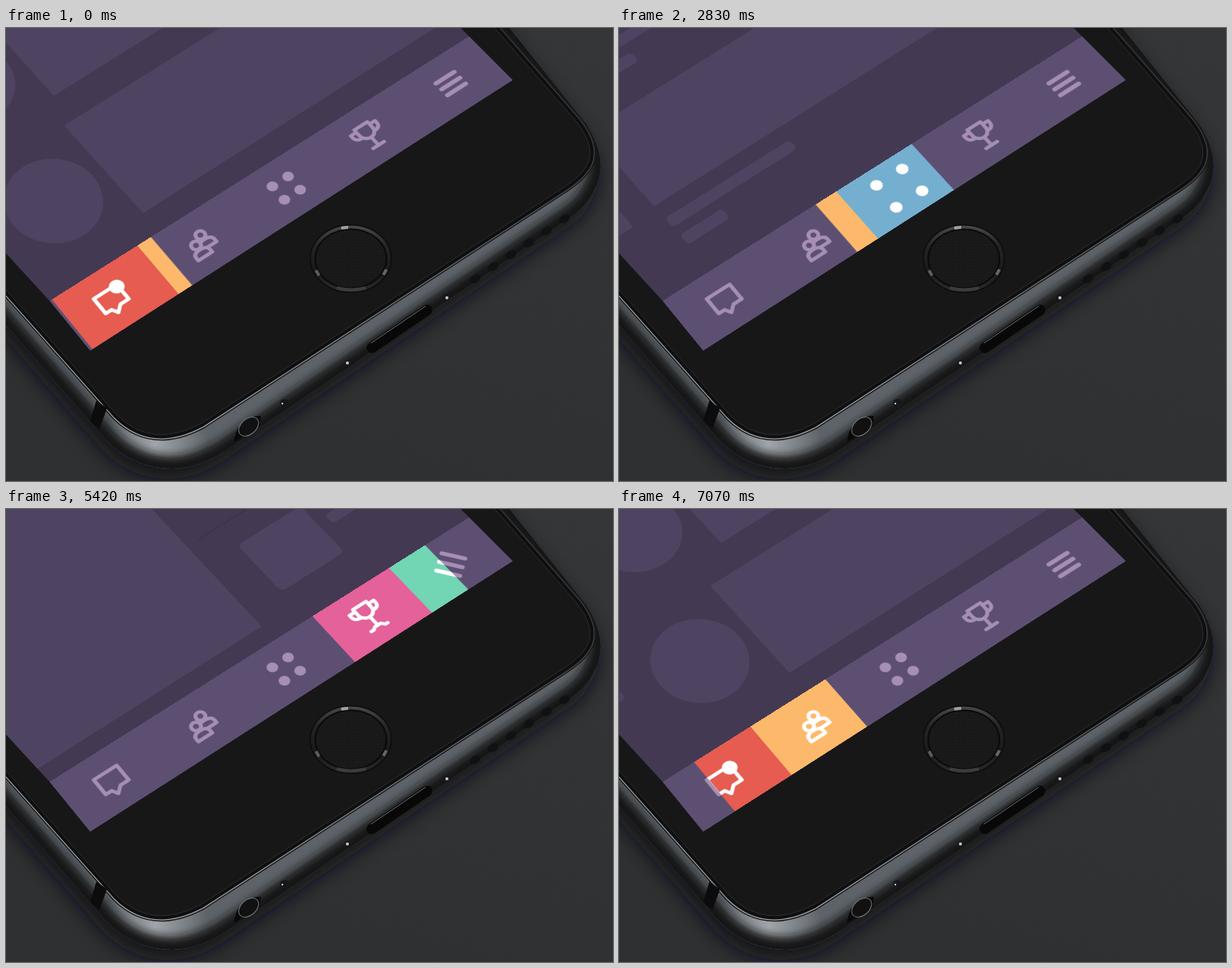
Write an HTML page that moves like this. It is 793 px wide and 591 px high and loops after 7120 ms.

```html
<!DOCTYPE html>
<html lang="en">
<head>
<meta charset="utf-8">
<title>Tab bar</title>
<style>
  html, body { margin: 0; width: 100%; height: 100%; overflow: hidden; background: #333436; }
  #stage { position: relative; width: 793px; height: 591px; overflow: hidden; }
  #stage > svg, #screen { position: absolute; left: 0; top: 0; }
  #screen {
    width: 793px; height: 591px; background: #443952;
    clip-path: polygon(0 0, 594px 0, 662px 68px, 110px 421px, 57px 356px, 0 294px);
  }
  #screen svg { position: absolute; left: 0; top: 0; transform-origin: 0 0; overflow: visible; }
  #pages { fill: #4e4461; }
  .icon { fill: none; stroke: currentColor; stroke-width: 5.5; stroke-linejoin: round; stroke-linecap: round; }
  .solid { fill: currentColor; stroke: none; }
  .front { fill: var(--back); }
</style>
</head>
<body>
<div id="stage">
  <svg width="793" height="591" viewBox="0 0 793 591">
    <defs>
      <linearGradient id="bg" x1="1" y1="0" x2=".6" y2="1">
        <stop offset="0" stop-color="#353638"/><stop offset="1" stop-color="#2f3032"/>
      </linearGradient>
      <linearGradient id="edge" gradientUnits="userSpaceOnUse" x1="760" y1="0" x2="300" y2="500">
        <stop offset="0" stop-color="#2b2d2f"/><stop offset=".45" stop-color="#5c6165"/>
        <stop offset="1" stop-color="#a0a5a9"/>
      </linearGradient>
      <radialGradient id="shine" gradientUnits="userSpaceOnUse" cx="195" cy="544" r="70">
        <stop offset="0" stop-color="#b4b8bc" stop-opacity=".8"/>
        <stop offset="1" stop-color="#b4b8bc" stop-opacity="0"/>
      </radialGradient>
      <linearGradient id="ring" x1="0" y1="0" x2="0" y2="1">
        <stop offset="0" stop-color="#4a4a4a"/><stop offset=".3" stop-color="#242424"/>
        <stop offset=".7" stop-color="#191919"/><stop offset="1" stop-color="#2c2c2c"/>
      </linearGradient>
      <pattern id="mesh" width="4" height="4" patternUnits="userSpaceOnUse">
        <rect width="4" height="4" fill="#1a1a1a"/><rect width="1.5" height="1.5" fill="#141414"/>
      </pattern>
      <filter id="soft" x="-20%" y="-20%" width="140%" height="140%"><feGaussianBlur stdDeviation="13"/></filter>
      <filter id="falloff" x="-20%" y="-20%" width="140%" height="140%"><feGaussianBlur stdDeviation="6"/></filter>
      <path id="body" d="M-40 -20H642L758 125Q790 175 768 213Q760 232 735 249L300 543Q258 574 218 575Q165 575 128 535L-40 342Z"/>
      <path id="glass" d="M-20 -20H621L745 122Q775 160 755 185Q748 195 730 207L255 516Q190 550 145 505L-20 319Z"/>
      <clipPath id="inside"><use href="#body"/></clipPath>
    </defs>
    <rect width="793" height="591" fill="url(#bg)"/>
    <use href="#body" x="-4" y="13" fill="#101112" opacity=".85" filter="url(#soft)"/>
    <use href="#body" fill="#5d6368"/>
    <g clip-path="url(#inside)">
      <use href="#body" fill="url(#shine)"/>
      <use href="#body" fill="none" stroke="#141516" stroke-width="32" filter="url(#falloff)"/>
    </g>
    <use href="#glass" fill="none" stroke="#1a1b1c" stroke-width="15"/>
    <use href="#glass" fill="none" stroke="url(#edge)" stroke-width="12"/>
    <use href="#glass" fill="none" stroke="#0f0f10" stroke-width="9.500"/>
    <use href="#glass" fill="#171717" stroke="#2c2d2f" stroke-width="1"/>
    <path d="M118 486L132 496L122 523L110 513Z" fill="#0c0c0d"/>
    <path d="M478 417L550 368" stroke="#080808" stroke-width="14" stroke-linecap="round"/>
    <path d="M477 411L548 363" stroke="#6c7175" stroke-width="1" stroke-linecap="round"/>
    <path d="M298 540Q302 505 333 506L331 520Z" fill="#090909"/>
    <ellipse cx="317" cy="520" rx="15" ry="10" fill="#111" stroke="#75797d" stroke-width="1" transform="rotate(-42 317 520)"/>
    <g id="holes" fill="#101112"></g>
    <g fill="#17181a"><circle cx="447" cy="437" r="4.5"/><circle cx="576" cy="351" r="4.5"/><circle cx="364" cy="490" r="6"/></g>
    <g fill="#c5c8ca"><circle cx="446" cy="437" r="2"/><circle cx="576" cy="352" r="2"/><circle cx="361" cy="490" r="1.2"/></g>
    <ellipse cx="450.500" cy="301" rx="53" ry="44" fill="url(#ring)" stroke="#0c0c0c" stroke-width="1.5"/>
    <ellipse cx="450.500" cy="301" rx="46.500" ry="38.500" fill="url(#mesh)" stroke="#0a0a0a" stroke-width="2"/>
    <g fill="none" stroke-width="4">
      <path d="M438 261L447 260" stroke="#a0a0a0"/><path d="M493 322L497 315" stroke="#666"/>
      <path d="M405 316L409 323" stroke="#5c5c5c"/><path d="M432 339Q451 344 470 339" stroke="#3c3c3c"/>
    </g>
  </svg>

  <div id="screen">
    <svg id="pages" width="750" height="600"></svg>
    <svg id="bar" width="750" height="98">
      <clipPath id="win"><rect id="slot" height="98"/></clipPath>
      <rect width="750" height="98" fill="#5d4f72"/>
      <g id="idle" color="#a58fb2"></g>
      <g clip-path="url(#win)"><g id="tabs"></g><g id="active" color="#fff"></g></g>
    </svg>
  </div>
</div>

<script>
const $ = id => document.getElementById(id);
const LOOP = 7120;
const COLORS = ['#e65c50', '#fdb96b', '#75afd0', '#e56199', '#72d5b4'];

// from tab, to tab, start of the highlight, start of the page slide
const MOVES = [
  [4, 0, -905, -859],
  [0, 1, 720, 720],
  [1, 2, 2130, 2130],
  [2, 3, 3550, 3550],
  [3, 4, 4985, 4985],
  [4, 0, 6355, 6372]
];

const mix = (a, b, f) => a + (b - a) * f;

// The curve cubic-bezier(.25, .1, .25, 1), solved by bisection.
function ease(p) {
  if (p <= 0) return 0;
  if (p >= 1) return 1;
  let lo = 0, hi = 1, s;
  for (let i = 0; i < 24; i++) {
    s = (lo + hi) / 2;
    if (.75 * s * (1 - s) + s ** 3 < p) lo = s; else hi = s;
  }
  return .3 * s * (1 - s) ** 2 + 3 * s * s * (1 - s) + s ** 3;
}

// Maps a w x h box onto four corners, clockwise from the top left.
function warp(el, w, h, [[x0, y0], [x1, y1], [x2, y2], [x3, y3]]) {
  const ax = x1 - x2, ay = y1 - y2, bx = x3 - x2, by = y3 - y2;
  const sx = x0 - x1 + x2 - x3, sy = y0 - y1 + y2 - y3;
  const det = ax * by - bx * ay;
  const g = (sx * by - bx * sy) / det, k = (ax * sy - sx * ay) / det;
  const m = [
    (x1 - x0 + g * x1) / w, (y1 - y0 + g * y1) / w, 0, g / w,
    (x3 - x0 + k * x3) / h, (y3 - y0 + k * y3) / h, 0, k / h,
    0, 0, 1, 0, x0, y0, 0, 1
  ];
  el.style.transform = `matrix3d(${m.map(v => v.toFixed(9))})`;
}
warp($('pages'), 750, 600, [[-220, 40], [309, -285], [662, 68], [110, 421]]);
warp($('bar'), 750, 98, [[57, 356], [605, 11], [662, 68], [110, 421]]);

const box = (x, y, right, bottom, r = 0, extra = '') =>
  `<rect x="${x}" y="${y}" width="${right - x}" height="${bottom - y}" rx="${r}" ${extra}/>`;

// Distance between rows and the lowest row of each page.
const PAGES = [
  [230, box(188, 287, 727, 468) + '<circle cx="99" cy="378" r="70"/>'],
  [195, box(172, 354, 727, 385, 4) + box(172, 398, 396, 416, 6) + box(211, 440, 287, 459, 6)
    + '<circle cx="92" cy="406" r="55" stroke="#402f51" stroke-width="11"/>'
    + '<path d="M187 464L176 450A13 13 0 1 1 198 450Z"/><circle cx="187" cy="443" r="5" fill="#443952"/>'],
  [287, box(21, 220, 727, 375) + box(21, 400, 243, 418, 6) + box(21, 434, 96, 453, 6)],
  [700, box(21, -150, 731, 478)],
  [190, box(40, 351, 154, 449, 8) + box(172, 348, 727, 366, 6) + box(172, 384, 354, 402, 6)
    + box(0, 309, 750, 311, 0, 'fill="#3d334a"')]
];
$('pages').innerHTML = PAGES.map(([pitch, row]) =>
  '<g>' + [0, 1, 2, 3].map(k => `<g><g transform="translate(0 ${-k * pitch})">${row}</g></g>`).join('') + '</g>'
).join('');
const pages = [...$('pages').children];

const person = (x, y) =>
  `<g class="front" transform="translate(${x} ${y})"><path d="M-12 14V9Q-12 1 0 1T12 9V14Z"/><circle cy="-8" r="7"/></g>`;
const FLAT = [[-10, 21], [-10, 21], [-4, 21], [4, 21], [10, 21], [10, 21]];
const PODIUM = [[-28, 26], [-9, 26], [-9, 12], [9, 12], [9, 35], [27, 35]];

// Icon markup around the tab centre; s runs from idle (0) to selected (1).
const ICONS = [
  s => `<path d="M-24 -15H15V14H1L-9 23L-14 14H-24Z"/><circle class="solid" cx="13" cy="-12" r="${11 * s}"/>`,
  s => person(mix(6, 15, s), mix(-2, -6, s)) + person(mix(-9, -17, s), mix(8, 11, s)),
  s => {
    const d = mix(14, 23, s), r = mix(8.3, 9, s);
    return [[-1, -1], [1, -1], [1, 1], [-1, 1]]
      .map(([x, y]) => `<circle class="solid" cx="${x * d}" cy="${y * d}" r="${r}"/>`).join('');
  },
  s => {
    const base = FLAT.map(([x, y], i) => [mix(x, PODIUM[i][0], s), mix(y, PODIUM[i][1], s)]);
    return `<path transform="translate(0 ${-13 * s})" d="M-12 -20H12V-8A12 12 0 0 1 -12 -8ZM-12 -15H-22V-11Q-22 -2 -11 -2M12 -15H22V-11Q22 -2 11 -2"/>`
      + `<path d="M0 ${4 - 13 * s}V${21 - 9 * s}"/><polyline points="${base.join(' ')}"/>`;
  },
  s => {
    const gap = mix(13, 18, s);
    return `<path stroke-width="7" transform="rotate(${90 * s})" d="M-17 ${-gap}H17M-17 0H17M-17 ${gap}H17"/>`;
  }
];
const slots = backs => backs.map((back, i) =>
  `<g class="icon" style="--back:${back}" transform="translate(${75 + 150 * i} 49)"></g>`).join('');
$('idle').innerHTML = slots(COLORS.map(() => '#5d4f72'));
$('active').innerHTML = slots(COLORS);
$('tabs').innerHTML = COLORS.map((c, i) => box(150 * i, 0, 150 * i + 150, 98, 0, `fill="${c}"`)).join('');

$('holes').innerHTML = [0, 1, 2, 3, 4, 5].map(i => {
  const x = 613 + 23.3 * i, y = 327 - 15.6 * i;
  return `<ellipse cx="${x}" cy="${y}" rx="7.500" ry="5" transform="rotate(-33 ${x} ${y})"/>`;
}).join('');

const poses = [];
function setPose(i, s) {
  if (poses[i] === s) return;
  poses[i] = s;
  const art = ICONS[i](s);
  $('idle').children[i].innerHTML = art;
  $('active').children[i].innerHTML = art;
}

function draw(t) {
  const [from, to, barAt, pageAt] = MOVES.filter(m => Math.min(m[2], m[3]) <= t).pop();
  const age = t - barAt;

  const lead = mix(from, to, ease((age - 235) / 750));
  const trail = mix(from, to, ease((age - 380) / 700));
  const left = 150 * Math.min(lead, trail), right = 150 * Math.max(lead, trail) + 150;
  $('slot').setAttribute('x', left);
  $('slot').setAttribute('width', right - left);

  ICONS.forEach((_, i) => {
    const s = i === to ? ease((age - 300) / 400) : i === from ? 1 - ease((age - 250) / 400) : 0;
    setPose(i, s);
  });

  pages.forEach((page, i) => {
    const shown = i === from || i === to;
    page.setAttribute('visibility', shown ? 'visible' : 'hidden');
    if (!shown) return;
    [...page.children].forEach((row, k) => {
      const f = ease((t - pageAt - 250 - 75 * k) / 700);
      row.setAttribute('transform', `translate(${750 * (i === to ? 1 - f : -f)} 0)`);
    });
  });
}

const start = performance.now();
function tick() {
  draw((performance.now() - start) % LOOP);
  requestAnimationFrame(tick);
}
tick();
</script>
</body>
</html>
```
